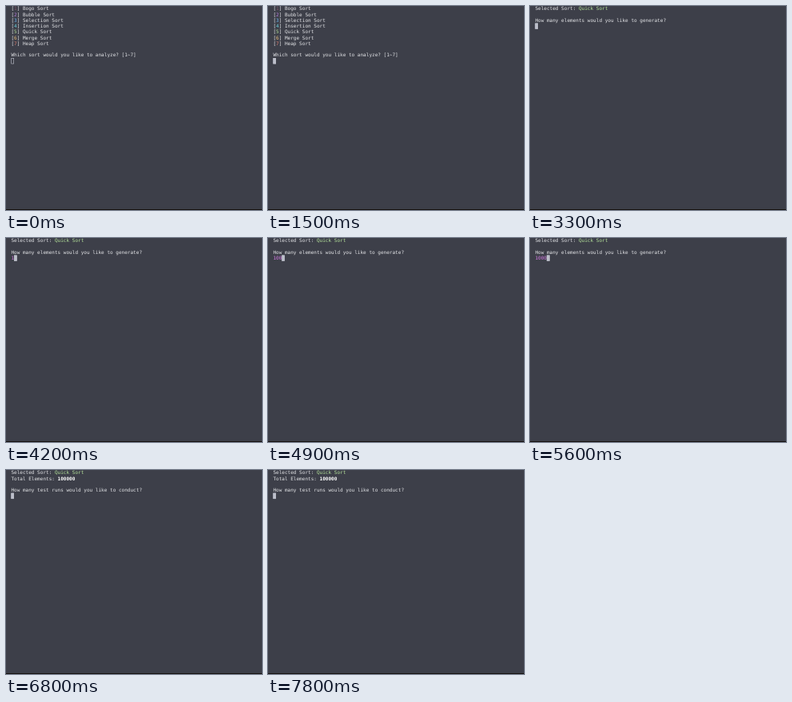
Recreate the animation shown at these times as an HTML page. Size 320 px wide and 255 px high, loop 8000 ms.

```html
<!DOCTYPE html>
<html lang="en">
<head>
<meta charset="utf-8">
<title>Sort analyzer terminal</title>
<style>
  html, body { margin: 0; width: 100%; height: 100%; overflow: hidden; background: #3d3f49; }
  .stage { position: absolute; left: 0; top: 0; width: 320px; height: 255px; overflow: hidden; background: #3d3f49; }
  .stage::after { content: ""; position: absolute; left: 0; right: 0; bottom: 0; height: 1px; background: #15110f; }

  /* Laid out ten times larger so that the cell width stays fractional. */
  .screen {
    position: absolute; left: 0; top: 0; margin: 0;
    font: 60.4px/72.6px "DejaVu Sans Mono", Menlo, monospace;
    text-rendering: geometricPrecision;
    color: #e4e5e8; white-space: pre;
    transform: translate(6.4px, -.25px) scale(.1); transform-origin: 0 0;
    visibility: hidden;
    animation: 8s step-end infinite;
  }
  .menu { animation-name: menu; }
  .count { animation-name: count; }
  .runs { animation-name: runs; }
  @keyframes menu { 0% { visibility: visible; } 41.25%, 100% { visibility: hidden; } }
  @keyframes count { 0% { visibility: hidden; } 41.25% { visibility: visible; } 85%, 100% { visibility: hidden; } }
  @keyframes runs { 0% { visibility: hidden; } 85%, 100% { visibility: visible; } }

  .entry, .cursor { display: inline-block; height: 72.6px; vertical-align: top; }
  .entry { width: 0; overflow: hidden; color: #d27be2; animation: 8s step-end infinite; }
  .choice { animation-name: choice; }
  .amount { animation-name: amount; }
  @keyframes choice { 0% { width: 0; } 37.5%, 100% { width: 1ch; } }
  @keyframes amount {
    0% { width: 0; }
    52.5% { width: 1ch; }
    56.25% { width: 2ch; }
    60% { width: 3ch; }
    66.25% { width: 4ch; }
    71.25% { width: 5ch; }
    76.25%, 100% { width: 6ch; }
  }

  .cursor { width: 1ch; box-sizing: border-box; border: 6px solid #bcbfca; background: #bcbfca; }
  .menu .cursor { animation: focus 8s step-end infinite; }
  @keyframes focus { 0% { background: transparent; } 12.5%, 100% { background: #bcbfca; } }

  .dim { color: #80586a; }
  .violet { color: #b980e0; }
  .blue { color: #6fb5f0; }
  .cyan { color: #6cd0dc; }
  .green { color: #b4e29a; }
  .yellow { color: #e6bd7e; }
  .red { color: #dc7f72; }
  b { color: #fff; }
</style>
</head>
<body>
<div class="stage">
<pre class="screen menu">[<span class="dim">1</span>] Bogo Sort
[<span class="violet">2</span>] Bubble Sort
[<span class="blue">3</span>] Selection Sort
[<span class="cyan">4</span>] Insertion Sort
[<span class="green">5</span>] Quick Sort
[<span class="yellow">6</span>] Merge Sort
[<span class="red">7</span>] Heap Sort

Which sort would you like to analyze? [1~7]
<span class="entry choice">5</span><span class="cursor"></span></pre>
<pre class="screen count">Selected Sort: <span class="green">Quick Sort</span>

How many elements would you like to generate?
<span class="entry amount">100000</span><span class="cursor"></span></pre>
<pre class="screen runs">Selected Sort: <span class="green">Quick Sort</span>
Total Elements: <b>100000</b>

How many test runs would you like to conduct?
<span class="cursor"></span></pre>
</div>
</body>
</html>
```
